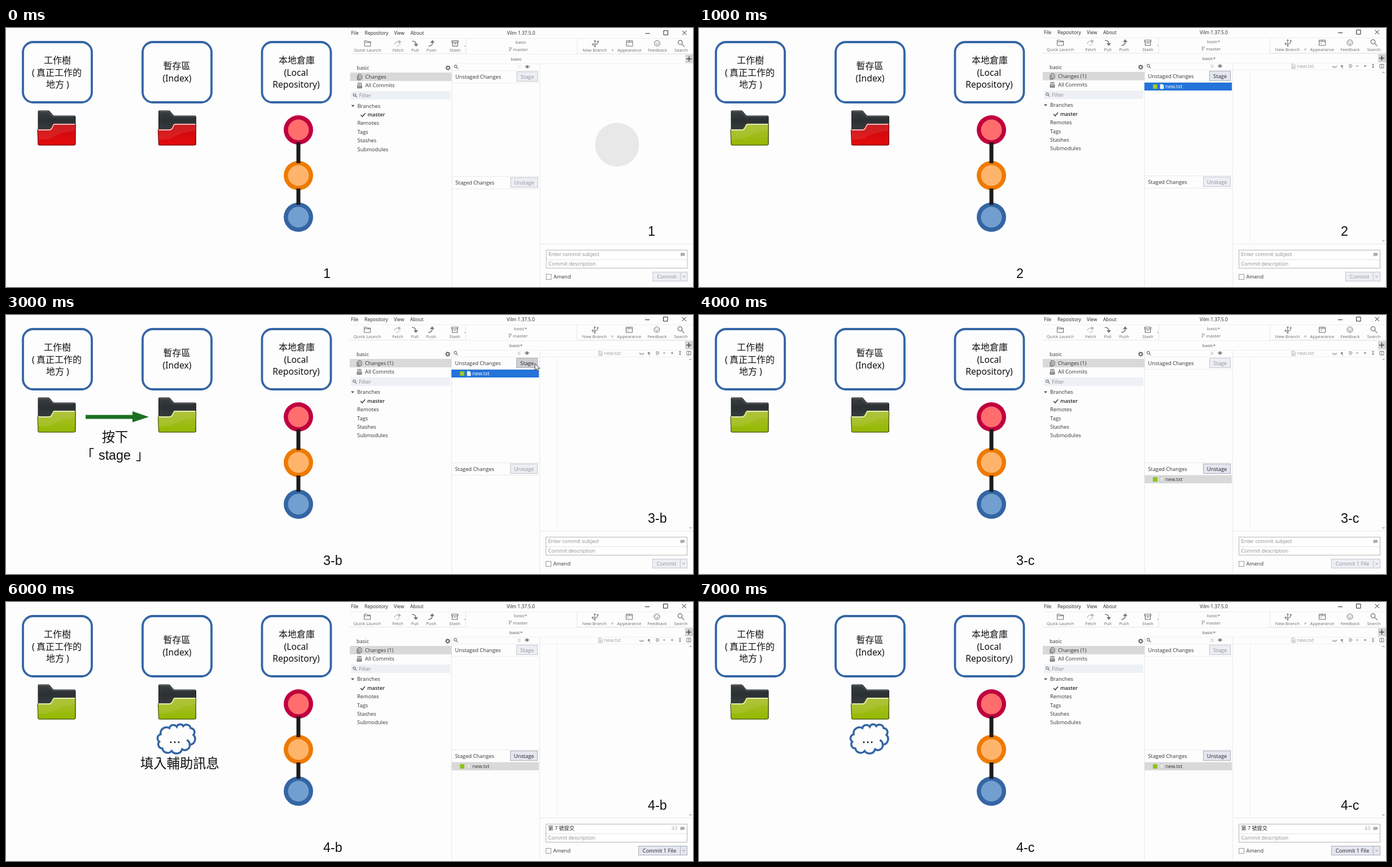
These frames come from a looping animation (1217x460 px, 8 s). An HTML page with a canvas:

```html
<!DOCTYPE html>
<html lang="zh-Hant">
<head>
<meta charset="utf-8">
<style>
html, body { margin: 0; width: 100%; height: 100%; overflow: hidden; background: #fdfdfd; }
canvas { display: block; }
</style>
</head>
<body>
<canvas id="stage" width="1217" height="460"></canvas>
<script>
const ctx = document.getElementById('stage').getContext('2d');
const UI = '"Open Sans", "Noto Sans CJK TC", "Noto Sans CJK", sans-serif';
const LATIN = '"Noto Sans", sans-serif';
const CJK = '"Noto Sans CJK TC", "Noto Sans CJK", sans-serif';
const ARIAL = '"Liberation Sans", sans-serif';
const BLUE = '#3465a4', INK = '#333', MUTED = '#8b8b8b', ICON = '#6c6c6c';
const STEPS = ['1', '2', '3-a', '3-b', '3-c', '4-a', '4-b', '4-c'];

const FOLDERS = {
  red: { edge: '#8a1416', rim: '#f3b9ba', top: '#c40d10', mid: '#d60a0d', low: '#e40a0c' },
  green: { edge: '#566a14', rim: '#e3ebb8', top: '#a9bd2c', mid: '#a0bd1a', low: '#94b800' }
};

function text(s, x, y, size, color = INK, align = 'left', family = UI, weight = 400) {
  ctx.font = `${weight} ${size}px ${family}`;
  ctx.fillStyle = color;
  ctx.textAlign = align;
  ctx.fillText(s, x, y);
}

const label = (s, x, y) => text(s, x, y, 23.3, '#111', 'left', ARIAL);
const hanzi = (s, x, y, size, align = 'left') => text(s, x, y, size, '#111', align, CJK, 300);

function fill(x, y, w, h, color) {
  ctx.fillStyle = color;
  ctx.fillRect(x, y, w, h);
}

function frame(x, y, w, h, color, width = 1) {
  ctx.strokeStyle = color;
  ctx.lineWidth = width;
  ctx.strokeRect(x, y, w, h);
}

function disc(x, y, r, color) {
  ctx.fillStyle = color;
  ctx.beginPath();
  ctx.arc(x, y, r, 0, Math.PI * 2);
  ctx.fill();
}

function stroke(d, color = ICON, width = 1) {
  ctx.strokeStyle = color;
  ctx.lineWidth = width;
  ctx.stroke(new Path2D(d));
}

function shape(d, color) {
  ctx.fillStyle = color;
  ctx.fill(new Path2D(d));
}

function at(x, y, draw) {
  ctx.save();
  ctx.translate(x, y);
  draw();
  ctx.restore();
}

function gradient(y0, y1, ...colors) {
  const g = ctx.createLinearGradient(0, y0, 0, y1);
  colors.forEach((c, i) => g.addColorStop(i / (colors.length - 1), c));
  return g;
}

// Diagram on the left

function titleBox(x) {
  ctx.strokeStyle = BLUE;
  ctx.lineWidth = 3.8;
  ctx.beginPath();
  ctx.roundRect(x, 25, 122, 107, 18);
  ctx.stroke();
}

function titles() {
  [30, 242, 453.5].forEach(titleBox);
  hanzi('工作樹', 91, 63, 16, 'center');
  text('(', 46, 85, 15.7, '#111', 'left', LATIN);
  hanzi('真正工作的', 54, 85, 16);
  hanzi('地方', 71, 106, 16);
  text(')', 107, 106, 15.7, '#111', 'left', LATIN);
  hanzi('暫存區', 302.5, 73, 16, 'center');
  hanzi('本地倉庫', 515, 63, 16, 'center');
  [['(Index)', 303, 95], ['(Local', 514, 85], ['Repository)', 514, 106]]
    .forEach(([s, x, y]) => text(s, x, y, 15.7, '#111', 'center', LATIN));
}

function folder(x, kind) {
  const c = FOLDERS[kind];
  at(x, 146, () => {
    const back = 'M2 61V2Q2 1 3 1H20Q22 1 23 3L28 9Q29 10 31 10H66Q68 10 68 12V61Z';
    shape(back, gradient(0, 36, '#3b4043', '#2b3032', '#373c3f'));
    stroke(back, '#202426', 1);
    stroke('M3 2.5H20L28 11H66', '#666d70', 1);
    const front = 'M1 36Q1 34.5 3 34.5H21Q24 34 25 31L28 26Q29 24.5 31 24.5H66Q68 24.5 68 26.5L67.5 60Q67.5 62 65 62H4Q2 62 2 60Z';
    shape(front, gradient(24, 62, c.top, c.mid, c.low));
    ctx.save();
    ctx.clip(new Path2D(front));
    shape('M0 34H24L30 24H70V36Q40 39 27 49Q15 53 0 52Z', 'rgba(255,255,255,.08)');
    ctx.restore();
    stroke(front, c.edge, 1.4);
    stroke('M2 35H22Q25 34.5 26.5 31.5L29 26Q30 25 31 25H67', c.rim, 1.8);
  });
}

function commits() {
  const nodes = [[181, '#c0003f', '#ff6d6d'], [262, '#ee7a00', '#ffb46c'], [336, BLUE, '#729fcf']];
  for (const [y, outer, inner] of nodes) {
    disc(518, y, 26, outer);
    disc(518, y, 18.5, inner);
  }
  fill(514.5, 203, 7, 37, '#1c1c1c');
  fill(514.5, 285, 7, 29, '#1c1c1c');
}

function stageArrow() {
  fill(141, 177.5, 84, 7, '#1b7022');
  shape('M224 171L253 181L224 190.5Z', '#1b7022');
  hanzi('按下', 193, 225, 23.3, 'center');
  hanzi('「', 133, 257, 23.3);
  label('stage', 164, 257);
  hanzi('」', 230, 257, 23.3);
}

function cloud(dots) {
  const cusps = [[274, 235], [289.5, 224], [302.5, 221.5], [314, 220.5], [327, 224],
    [332, 236], [325.5, 253.5], [312, 261.5], [293.5, 264.5], [277, 260], [271.5, 248]];
  let d = `M${cusps[0]}`;
  cusps.forEach((p, i) => {
    const q = cusps[(i + 1) % cusps.length];
    const r = Math.hypot(q[0] - p[0], q[1] - p[1]) * 0.55;
    d += `A${r} ${r} 0 0 1 ${q}`;
  });
  stroke(d + 'ZM325.5 253.5C325.7 251.5 324.3 247 320.3 245', BLUE, 3.5);
  if (dots) for (const x of [292, 299, 306]) disc(x, 249, 1.5, '#111');
}

function diagram(step) {
  titles();
  folder(55, step ? 'green' : 'red');
  folder(268.5, step > 2 ? 'green' : 'red');
  commits();
  if (step === 2 || step === 3) stageArrow();
  if (step > 4) cloud(step > 5);
  if (step === 5 || step === 6) hanzi('填入輔助訊息', 238, 295, 23.3);
  label(STEPS[step], 562, 444);
}

// Application window on the right

function magnifier(x, y, r, color = ICON) {
  at(x, y, () => {
    stroke(`M${r} 0A${r} ${r} 0 1 1 ${-r} 0A${r} ${r} 0 1 1 ${r} 0M${r * .7} ${r * .7}L${r * 2} ${r * 2}`, color, 1.2);
  });
}

function page(x, y, color = '#999') {
  at(x, y, () => {
    shape('M-3 -4H1L3 -2V4H-3Z', '#f4f4f4');
    stroke('M-3 -4H1L3 -2V4H-3ZM-1.5 0H1.5M-1.5 2H1.5', color, .8);
  });
}

function branch(x, y, s) {
  at(x, y, () => {
    ctx.scale(s, s);
    stroke('M-2 -3V4M-2 2Q3 2 3 -2M-2 -3A1 1 0 1 1 -2 -5A1 1 0 1 1 -2 -3M3 -2A1 1 0 1 1 3 -4A1 1 0 1 1 3 -2M-2 6A1 1 0 1 1 -2 4A1 1 0 1 1 -2 6');
  });
}

function button(caption, x, y, w, h, enabled, back) {
  fill(x, y, w, h, back || (enabled ? '#e3e6ee' : '#eceef3'));
  frame(x + .5, y + .5, w - 1, h - 1, enabled ? '#a9aeb8' : '#c3c7cf');
  text(caption, x + w / 2, y + h / 2 + 3.5, 9.3, enabled ? '#222' : '#8d929c', 'center');
}

function fileRow(y, selected) {
  fill(789, y, 155, 14, selected ? '#2473d9' : '#d9d9d9');
  fill(804, y + 3, 8, 8, '#8fc321');
  if (selected) fill(806, y + 6.5, 4, 1, '#d8ecae');
  page(820, y + 7, selected ? '#dbe6f5' : '#b5b5b5');
  text('new.txt', 826, y + 10, 9, selected ? '#fff' : INK);
}

function toolbar(name) {
  [['File', 611], ['Repository', 635], ['View', 687], ['About', 716]]
    .forEach(([s, x]) => text(s, x, 10.6, 8.4, '#222'));
  text('Vilm 1.37.5.0', 912, 10.6, 8.4, '#222', 'center');
  stroke('M1132 8.5H1140M1164.5 3.5H1172V11H1164.5ZM1197.5 3.5L1205 11M1205 3.5L1197.5 11', '#222');
  fill(609, 17, 608, 1, '#eee');
  fill(609, 44, 206, 1, '#e5e5e5');
  fill(1011, 44, 206, 1, '#e5e5e5');
  fill(814, 18, 1, 27, '#e5e5e5');
  fill(1011, 18, 1, 27, '#e5e5e5');
  [['Quick Launch', 640], ['Fetch', 694], ['Pull', 724], ['Push', 753], ['Stash', 795],
    ['New Branch', 1042.5], ['Appearance', 1104], ['Feedback', 1153.5], ['Search', 1195.5]]
    .forEach(([s, x]) => text(s, x, 41, 7.7, ICON, 'center'));
  at(640, 26, () => stroke('M-5.5 5V-4.5H-1L0 -3H5.5V5ZM-5.5 -1.5H5.5'));
  at(694, 26, () => {
    stroke('M-6 2Q-5 -3.5 2 -3', '#999');
    shape('M1 -6L6 -2.5L1 1Z', '#b5b5b5');
    stroke('M-3 5Q3 5 4 1', '#b5b5b5');
  });
  at(723, 26, () => {
    stroke('M-4 -4Q3 -4 3 2', '#777', 1.6);
    shape('M-1 1H7L3 6Z', '#777');
  });
  at(753, 26, () => {
    stroke('M-5 5Q2 5 2 -1', '#777', 1.6);
    shape('M-2 -1H6L2 -6Z', '#777');
  });
  at(795, 26, () => stroke('M-5.5 -4.5H5.5V-1.5H-5.5ZM-4.5 -1.5V5H4.5V-1.5M-2 1H2', ICON, 1.2));
  disc(812.5, 31, .8, ICON);
  at(1044, 26, () => {
    branch(1, 0, 1.05);
    stroke('M-7 2H-2M-4.5 -.5V4.5');
  });
  stroke('M1072 37.5H1076M1073 39.5H1075', '#999');
  at(1104, 26, () => {
    stroke('M-5.5 -4.5H5.5V5H-5.5ZM-5.5 -2H5.5M0 -4.5V-2');
    fill(-4, 0, 4, 3, '#ddd');
  });
  at(1153, 26, () => {
    stroke('M5 0A5 5 0 1 1 -5 0A5 5 0 1 1 5 0M-2.5 1Q0 4 2.5 1');
    disc(-2, -1.5, .8, ICON);
    disc(2, -1.5, .8, ICON);
  });
  magnifier(1194, 24.5, 3.8);
  text(name, 911.5, 27, 8, ICON, 'center');
  branch(893, 36, .65);
  text('master', 898, 40, 8, ICON);
  fill(815, 45, 388, 1, '#f1f1f1');
  text(name, 903.5, 57, 8, '#555', 'center');
  fill(1203, 46, 14, 15, '#d5d5d5');
  stroke('M1205 53.5H1214M1209.5 49V58', '#444', 1.4);
  fill(789, 62, 428, 1, '#f0f0f0');
}

function sidebar(dirty) {
  text('basic', 621, 73, 9.2);
  at(782.5, 69.5, () => {
    stroke('M2.5 0A2.5 2.5 0 1 1 -2.5 0A2.5 2.5 0 1 1 2.5 0M-4.5 0H-2.5M2.5 0H4.5M0 -4.5V-2.5M0 2.5V4.5M-3.2 -3.2L-2 -2M2 2L3.2 3.2M3.2 -3.2L2 -2M-2 2L-3.2 3.2', '#555', 1.3);
  });
  fill(609, 78, 180, 15, '#d9d9d9');
  at(626, 86, () => stroke('M-4 -3V5H2M-2 -5H2L4 -3V3H-2ZM0 -2H2M0 0H2', '#555'));
  text(dirty ? 'Changes (1)' : 'Changes', 636, 88.5, 9.3);
  at(626, 101, () => {
    stroke('M-3 -4.5H3V1H-3ZM-1.5 -2.5H1.5M-1.5 -.5H1.5', '#666');
    shape('M-4.5 0H-2V2H2V0H4.5V5H-4.5Z', '#888');
  });
  text('All Commits', 636, 104, 9.3);
  fill(611, 111, 176, 15, '#edf0f5');
  magnifier(617, 117.5, 2.2, '#777');
  text('Filter', 625, 121.5, 9.2, MUTED);
  shape('M611 135.5H617L614 139Z', '#555');
  ['Branches', '', 'Remotes', 'Tags', 'Stashes', 'Submodules']
    .forEach((s, i) => text(s, 622, 140.3 + i * 15.4, 9.4));
  stroke('M628 153L631 156L636 150', '#444', 1.6);
  text('master', 640, 156, 9, '#222', 'left', UI, 600);
}

function lists(step) {
  const dirty = step > 0, staged = step > 3;
  fill(789, 62, 1, 397, '#e6e6e6');
  fill(945, 62, 1, 397, '#e9e9e9');
  magnifier(796, 67, 2.3, '#777');
  const chevrons = staged ? 'M-2.5 0L0 -2.5L2.5 0M-2.5 3L0 .5L2.5 3' : 'M-2.5 -3L0 -.5L2.5 -3M-2.5 0L0 2.5L2.5 0';
  at(909, 68, () => stroke(chevrons, dirty ? '#aaa' : '#ddd'));
  at(923, 67.5, () => {
    stroke('M-4 0Q0 -4.5 4 0Q0 4.5 -4 0Z', '#666');
    disc(0, 0, 1.5, '#555');
  });
  fill(789, 74, 156, 1, '#eee');
  fill(789, 96, 156, 1, '#eee');
  text('Unstaged Changes', 795.5, 88.7, 9.3);
  button('Stage', 904, 76, 38, 18, dirty && !staged, step === 3 && '#cdced1');
  fill(789, 262, 156, 1, '#e8e8e8');
  fill(789, 284, 156, 1, '#e8e8e8');
  text('Staged Changes', 795.5, 276.7, 9.3);
  button('Unstage', 893, 264, 49, 18, staged);
  if (dirty) fileRow(staged ? 285 : 97, !staged);
}

function diffPane(dirty) {
  if (!dirty) {
    disc(1082, 206, 39, '#e8e8e8');
    return;
  }
  fill(946, 74, 271, 1, '#efefef');
  fill(976, 75, 1, 306, '#ececec');
  page(1053, 68, '#a5a5a5');
  text('new.txt', 1059, 71, 9, '#a3a3a3');
  stroke('M1123 67V69.5H1129V67M1151 65.5H1156Q1158 68 1155 70H1152M1151 68H1154M1164 67.5H1168M1178 67.5H1182M1180 65.5V69.5M1194 64V71M1192.5 66L1194 64L1195.5 66M1192.5 69L1194 71L1195.5 69M1206 64.5H1213V71H1206ZM1209.5 64.5V71', '#777');
  text('¶', 1139, 71, 8, '#777', 'center');
  shape('M1209.5 80H1215.5L1212.5 77Z', '#bbb');
  shape('M1209.5 377H1215.5L1212.5 380Z', '#bbb');
}

function commitPane(step) {
  const staged = step > 3, written = step > 5;
  fill(946, 383, 271, 1, '#e8e8e8');
  fill(956, 394, 251, 33, '#fff');
  frame(956.5, 394.5, 250, 32, '#b5b5b5');
  fill(957, 411, 249, 1, '#e2e2e2');
  text(written ? '第 7 號提交' : 'Enter commit subject', 960.5, 405.3, 9.1, written ? '#222' : MUTED);
  text('Commit description', 960.5, 422.3, 9.1, MUTED);
  if (written) text('43', 1179, 405, 9, '#aaa');
  shape('M1194.5 399.5H1202V404.5H1198L1196 406V404.5H1194.5Z', '#aaa');
  frame(956.5, 437.5, 9, 9, '#999');
  text('Amend', 969.5, 445, 9.1);
  const x = staged ? 1120 : 1145;
  button(staged ? 'Commit 1 File' : 'Commit', x, 433, 1195 - x, 17, written);
  fill(1194, 433, 13, 17, written ? '#e3e6ee' : '#eceef3');
  frame(1194.5, 433.5, 12, 16, written ? '#a9aeb8' : '#c3c7cf');
  stroke('M1198.5 440.5L1200.5 442.5L1202.5 440.5', '#777');
}

function pointer() {
  const d = 'M937 86V98L939.8 95.5L942 100L944 99L942 94.8H945.5Z';
  shape(d, '#fff');
  stroke(d, '#333');
}

function appWindow(step) {
  const dirty = step > 0, nudge = dirty ? 0 : .5;
  const name = dirty ? 'basic*' : 'basic';
  at(nudge, nudge * 2.4, () => {
    toolbar(name);
    sidebar(dirty);
    lists(step);
    diffPane(dirty);
  });
  at(nudge, 0, () => commitPane(step));
  if (step === 2) frame(903, 75, 41, 21, '#ea1111', 4);
  if (step === 3) pointer();
  if (step === 5) frame(953.5, 394.5, 234.5, 14.5, '#f60707', 4);
  label(STEPS[step], 1137, 368.5);
}

function draw(now) {
  const step = Math.floor(now / 1000) % STEPS.length;
  fill(0, 0, 1217, 460, '#fdfdfd');
  diagram(step);
  appWindow(step);
  requestAnimationFrame(draw);
}

requestAnimationFrame(draw);
</script>
</body>
</html>
```
